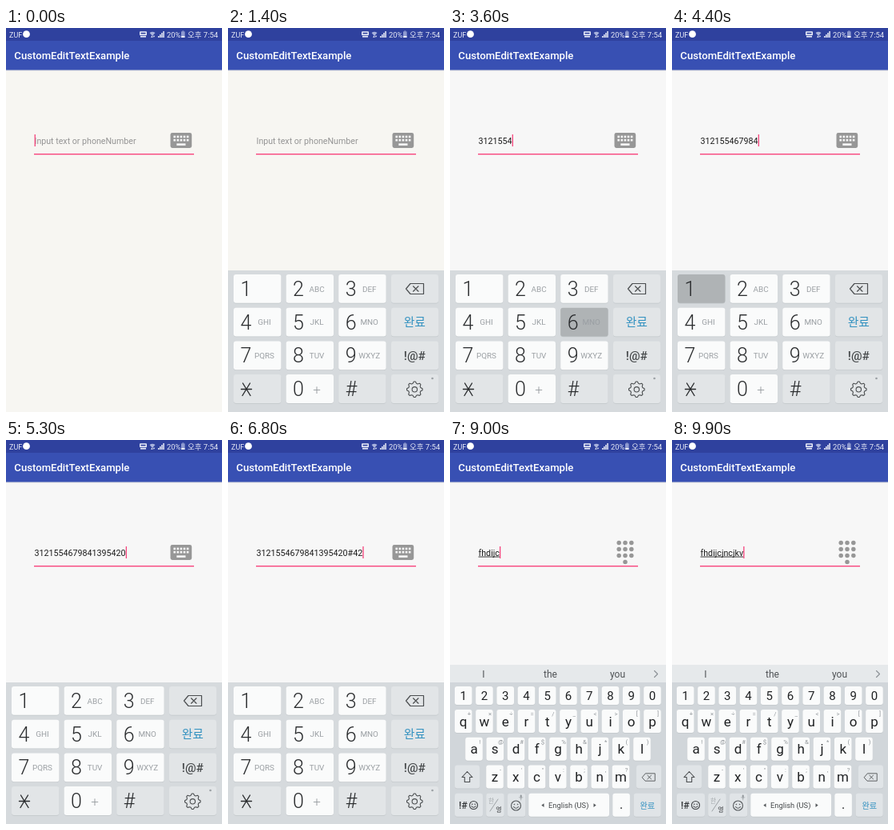
An HTML page for the animation above (10 s loop, 270 px wide and 480 px high).

```html
<!DOCTYPE html>
<html lang="en">
<head>
<meta charset="utf-8">
<title>CustomEditTextExample</title>
<style>
  html, body { margin: 0; width: 100%; height: 100%; overflow: hidden; background: #f7f7f7; }
  svg { display: block; width: 270px; height: 480px; }
  text { font-family: Roboto, "Noto Sans CJK KR", "Noto Sans CJK", sans-serif; white-space: pre; }
</style>
</head>
<body>
<svg id="stage" viewBox="0 0 270 480"></svg>
<script>
const LOOP = 10000, STEP = 100;
const NS = "http://www.w3.org/2000/svg";
const stage = document.getElementById("stage");

function el(parent, tag, attrs, content) {
  const node = document.createElementNS(NS, tag);
  for (const name in attrs) node.setAttribute(name, attrs[name]);
  if (content !== undefined) node.textContent = content;
  parent.appendChild(node);
  return node;
}
const group = parent => el(parent, "g", {});
const rect = (p, x, y, width, height, fill, rx = 0) => el(p, "rect", { x, y, width, height, fill, rx });
const dot = (p, cx, cy, r, fill) => el(p, "circle", { cx, cy, r, fill });
const line = (p, d, stroke, width = 1) =>
  el(p, "path", { d, stroke, fill: "none", "stroke-width": width, "stroke-linecap": "round", "stroke-linejoin": "round" });
const shape = (p, d, fill) => el(p, "path", { d, fill });
const label = (p, x, y, size, fill, str, anchor = "middle", weight = 400) =>
  el(p, "text", { x, y, fill, "font-size": size, "text-anchor": anchor, "font-weight": weight }, str);
const show = (node, on) => node.setAttribute("visibility", on ? "inherit" : "hidden");

// Page, status bar, app bar
const page = rect(stage, 0, 0, 270, 480, "#f7f7f7");
rect(stage, 0, 52, 270, 1.6, "#dcdde2");
rect(stage, 0, 16, 270, 36.5, "#3850b3");
rect(stage, 0, 0, 270, 16, "#2f419e");
label(stage, 10.3, 39, 13.15, "#fff", "CustomEditTextExample", "start", 500);

const pale = "#e8ebf7";
label(stage, 4, 11.5, 9, pale, "ZUF", "start");
dot(stage, 25.5, 7.7, 4.4, "#fff");
rect(stage, 167, 4.3, 9, 5, pale, 1);
rect(stage, 168.5, 5.8, 6, 1.6, "#2f419e");
rect(stage, 168, 10, 7, 1.6, pale);
shape(stage, "M179.5 6 Q183 3.4 186.5 6 L183 10Z", "#a9b3dd");
shape(stage, "M181 11.8l1.4-2.2 1.4 2.2zM183.6 9.8h2.6l-1.3 2z", pale);
for (let i = 0; i < 4; i++) rect(stage, 190 + i * 2.1, 10 - i * 2, 1.5, 2 + i * 2, pale);
label(stage, 201, 11.8, 9.4, pale, "20%", "start");
rect(stage, 220.3, 3.4, 2, 1.4, "#8f9bd0");
rect(stage, 219, 4.4, 4.6, 5.8, "#8f9bd0");
rect(stage, 219, 10, 4.6, 2, pale);
label(stage, 227, 11.8, 9.5, pale, "오후 7:54", "start");

// Input field
const hint = label(stage, 35.5, 144.5, 10.65, "#949494", "Input text or phoneNumber", "start");
const value = label(stage, 35.5, 144.5, 10.7, "#1c1c1c", "", "start");
const composing = rect(stage, 35.5, 145.6, 0, 0.9, "#222");
const cursor = rect(stage, 35.5, 133, 1.3, 15, "#f5447c");
rect(stage, 35, 157, 200, 1.4, "#f8457d");

const keyIcon = group(stage);
rect(keyIcon, 205.5, 131, 26.7, 19, "#979797", 2.4);
for (let i = 0; i < 5; i++) for (const y of [134.6, 138.9]) rect(keyIcon, 209.4 + i * 4.1, y, 2.6, 2.6, "#f7f7f7");
rect(keyIcon, 213.3, 144.3, 11.2, 2.6, "#f7f7f7");

const dialIcon = group(stage);
for (let i = 0; i < 9; i++) dot(dialIcon, 211.2 + i % 3 * 7.8, 128.6 + Math.floor(i / 3) * 7.9, 2.75, "#979797");
dot(dialIcon, 219, 152.4, 2.75, "#979797");

// Keys
const KEY = "#fafbfb", PRESSED = "#afb3b5", INK = "#2b2d2f", BLUE = "#3291c0";
const keys = {};

function key(p, id, x, y, w, h, fill) {
  rect(p, x, y + 0.8, w, h, "#c2c7ca", 3);
  const face = rect(p, x, y, w, h, fill, 3);
  keys[id] = { face, fill };
}
function backspace(p, cx, cy, s) {
  const g = el(p, "g", { transform: `translate(${cx} ${cy}) scale(${s})` });
  line(g, "M-11 0 L-5.5 -6.5 H11 V6.5 H-5.5Z M-2 -3.2 L4.5 3.2 M4.5 -3.2 L-2 3.2", "#4b4e50", 1.2);
}
function smiley(p, cx, cy, r, color) {
  line(p, `M${cx - r} ${cy}a${r} ${r} 0 1 0 ${2 * r} 0a${r} ${r} 0 1 0 ${-2 * r} 0M${cx - r / 2} ${cy + r * .25}q${r / 2} ${r * .6} ${r} 0`, color, 1.1);
  dot(p, cx - r * .35, cy - r * .25, .8, color);
  dot(p, cx + r * .35, cy - r * .25, .8, color);
}

// Numeric pad
const pad = group(stage);
rect(pad, 0, 303, 270, 177, "#d6dadd");
const letters = ["", "ABC", "DEF", "GHI", "JKL", "MNO", "PQRS", "TUV", "WXYZ", "", "+", ""];
[..."123456789*0#"].forEach((ch, i) => {
  const x = 7 + i % 3 * 65.6, y = 308 + Math.floor(i / 3) * 41.7;
  const side = ch === "*" || ch === "#";
  key(pad, "n" + ch, x, y, 59.4, 35.8, side ? "#e2e5e7" : KEY);
  if (ch === "*") line(pad, "M16.5 451.5H29.5M18.5 444L28 459.5M27.5 444L18 459.5", INK, 1.4);
  else label(pad, x + 8.5, y + 26.8, 25, INK, ch, "start", 300);
  label(pad, x + 38.5, y + (ch === "0" ? 24.5 : 21.6), ch === "0" ? 17 : 9.9, "#9a9fa3", letters[i], "middle", ch === "0" ? 300 : 400);
});
for (let i = 0; i < 4; i++) key(pad, "side" + i, 204, 308 + i * 41.7, 59, 35.8, "#e2e5e7");
backspace(pad, 233.5, 326, 1);
label(pad, 233.3, 373, 14.8, BLUE, "완료", "middle", 500);
label(pad, 233.3, 415, 15.2, "#45484a", "!@#", "middle", 500);
let gear = "M";
for (let i = 0; i < 32; i++) {
  const a = (i - .5) * Math.PI / 16, r = i % 4 < 2 ? 9.8 : 7.8;
  gear += `${233.3 + r * Math.sin(a)} ${451.8 - r * Math.cos(a)} `;
}
line(pad, gear + "Z", "#4b4e50", 1.1);
line(pad, "M230.1 451.8a3.2 3.2 0 1 0 6.4 0a3.2 3.2 0 1 0 -6.4 0", "#4b4e50", 1.1);
dot(pad, 255.5, 438, 1.3, "#9a9fa3");

// Letter keyboard
const qwerty = group(stage), words = group(qwerty);
rect(qwerty, 0, 303, 270, 177, "#d1d6da");
rect(words, 0, 281, 270, 22, "#e6e9eb");
label(words, 42, 296.5, 12, "#505356", "I");
label(words, 125.5, 296.5, 12, "#505356", "the");
label(words, 209.5, 296.5, 12, "#505356", "you");
line(words, "M255.5 288.5l4 4-4 4", "#8b9094", 1.1);

const rows = [
  ["1234567890", "", 16.7, 308, 23, 15],
  ["qwertyuiop", "+×÷=/_<>[]", 16.7, 337, 29, 17],
  ["asdfghjkl", "!@#$%&*()", 30, 371.7, 29, 17],
  ["zxcvbnm", "-'\":;,?", 56, 406.5, 29, 17]
];
for (const [chars, marks, x0, y, h, size] of rows) [...chars].forEach((ch, i) => {
  const x = x0 + i * 26.25;
  key(qwerty, "q" + ch, x - 10.8, y, 21.6, h, KEY);
  label(qwerty, x, y + (marks ? 20.7 : 17), size, "#1f2123", ch);
  if (marks) label(qwerty, x + 7.2, y + 8, 7.8, "#92979b", marks[i]);
});
const SOFT = "#e0e4e7";
key(qwerty, "shift", 6, 406.5, 31, 29, SOFT);
line(qwerty, "M21.5 414.5L28 421.5H24.7V427.5H18.3V421.5H15Z", "#4b4e50", 1.1);
key(qwerty, "del", 233, 406.5, 31, 29, SOFT);
backspace(qwerty, 248.3, 421.5, .72);
key(qwerty, "sym", 6, 441.7, 35, 29, SOFT);
label(qwerty, 11, 461, 12.3, "#303336", "!#", "start", 500);
smiley(qwerty, 29.5, 456.5, 5, "#404346");
key(qwerty, "lang", 45.2, 441.7, 22.5, 29, SOFT);
label(qwerty, 51.5, 453.5, 7.5, "#a2a7ab", "한");
line(qwerty, "M50 464L60 449", "#8b9094", .8);
label(qwerty, 61, 465, 8, "#404346", "영");
key(qwerty, "emoji", 72, 441.7, 22.3, 29, SOFT);
smiley(qwerty, 82.5, 457, 6, "#55595c");
rect(qwerty, 87.7, 443.5, 2, 4, "#92979b", 1);
line(qwerty, "M86.5 446.5q2.2 3.5 4.4 0M88.7 448.5v1.5", "#92979b", .6);
key(qwerty, "space", 98.3, 441.7, 100.7, 29, KEY);
label(qwerty, 148.2, 459.8, 9.3, "#45484a", "English (US)");
shape(qwerty, "M117.5 454.3v4.6l-3.2-2.3zM179.5 454.3v4.6l3.2-2.3z", "#55595c");
key(qwerty, "dot", 203.3, 441.7, 21.6, 29, KEY);
label(qwerty, 214, 461, 16, "#1f2123", ".");
key(qwerty, "done", 229.7, 441.7, 34, 29, SOFT);
label(qwerty, 246.8, 460.5, 10.2, BLUE, "완료", "middle", 500);

// Typing schedule: [character, commit time, key hold]
const run = (str, start, gap) => [...str].map((ch, i) => [ch, start + i * gap, 100]);
const SWITCH = 7200;
const digits = [
  ["3", 2000, 0], ["1", 2600, 100], ["2", 2800, 100], ["1", 3000, 0],
  ...run("554", 3300, 100), ...run("679841395420", 3700, 145), ...run("#42", 5500, 150)
];
const text = run("fhdijcjncjkv", 8250, 150);

function render(t) {
  const second = t >= SWITCH;
  const typed = (second ? text : digits).filter(e => e[1] <= t);
  const last = typed.length ? typed[typed.length - 1][1] : second ? SWITCH : -200;
  const edit = Math.floor(last / STEP) * STEP + (last % STEP > 0 ? STEP : 0);

  page.setAttribute("fill", t < 2000 ? "#f7f6f2" : "#f7f7f7");
  value.textContent = typed.map(e => e[0]).join("");
  const width = typed.length ? value.getComputedTextLength() : 0;
  show(hint, !typed.length);
  composing.setAttribute("width", second ? width : 0);
  cursor.setAttribute("x", 35.6 + width);
  show(cursor, (t - edit) % 1000 < 500);
  show(keyIcon, !second);
  show(dialIcon, second);

  const p = Math.min(1, Math.max(0, (t - 700) / 400));
  pad.setAttribute("transform", `translate(0 ${177 * (1 - p) ** 2})`);
  show(pad, p > 0 && t < 7400);
  show(qwerty, t >= 7400);
  show(words, t >= 7600);

  for (const id in keys) keys[id].face.setAttribute("fill", keys[id].fill);
  const press = (list, prefix) => list.forEach(([ch, at, hold]) => {
    if (t >= at - hold && t < at) keys[prefix + ch].face.setAttribute("fill", PRESSED);
  });
  press(digits, "n");
  press(text, "q");
}

const begin = performance.now();
let shown = -1;
function tick() {
  const t = Math.floor((performance.now() - begin) % LOOP / STEP) * STEP;
  if (t !== shown) render(shown = t);
  requestAnimationFrame(tick);
}
tick();
</script>
</body>
</html>
```
